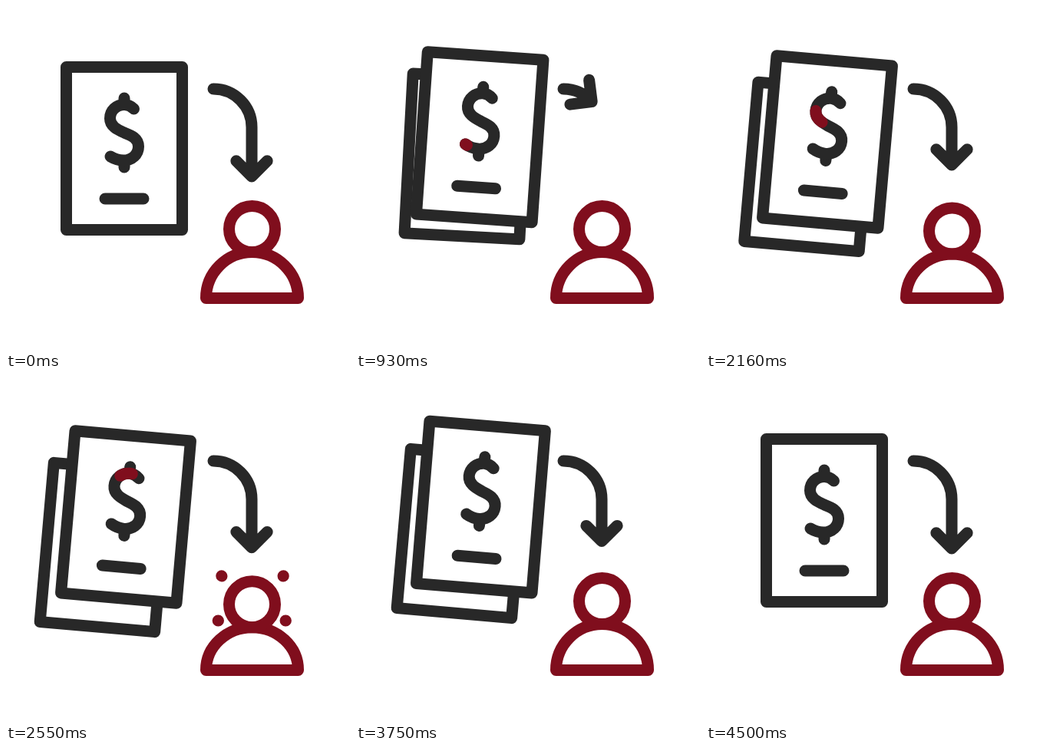
An HTML page that plays this animation: 448x448 px, repeating every 4980 ms.

```html
<!DOCTYPE html>
<html lang="en">
<head>
<meta charset="utf-8">
<title>Document sent to a person</title>
<style>
  html, body { margin: 0; width: 100%; height: 100%; overflow: hidden; background: #fff; }
  svg { display: block; width: 100%; height: 100%; }
  path, rect, circle { stroke-width: 15; stroke-linecap: round; stroke-linejoin: round; }
  .dark { stroke: #282828; }
  .red { stroke: #800e1d; }
  .paper { fill: #fff; }
</style>
</head>
<body>
<svg viewBox="0 0 448 448" fill="none">
  <rect id="back" class="dark paper" x="-75" y="-104" width="150" height="208"/>
  <g id="front">
    <rect class="dark paper" x="-75.5" y="-106" width="151" height="212"/>
    <path class="dark" d="M-25 65.5H25M0 -65.5V-58M0 17V24.5"/>
    <path class="dark" id="curve"/>
    <path class="red" id="trail" pathLength="100"/>
    <path class="red" id="nub"/>
  </g>
  <path id="arrow" class="dark"/>
  <path id="rays" class="red"/>
  <path id="body" class="red"/>
  <circle id="head" class="red" cx="320.5" r="30"/>
</svg>
<script>
const LOOP = 4980, STEP = 30;
const $ = id => document.getElementById(id);
const set = (id, attrs) => {
  for (const key in attrs) $(id).setAttribute(key, attrs[key]);
};

const span = (t, from, to) => Math.min(1, Math.max(0, (t - from) / (to - from)));
const sine = (t, from, to) => (1 - Math.cos(Math.PI * span(t, from, to))) / 2;
const cubic = (t, from, to) => {
  const u = span(t, from, to);
  return u < 0.5 ? 4 * u ** 3 : 1 - 4 * (1 - u) ** 3;
};
const mix = (a, b, u) => a + (b - a) * u;

const S_CURVE = 'M-18 10.5C-13 13.5 -7 15.5 -1 15.5C10 15.5 18.5 8 18.5 -2.5' +
  'C18.5 -13.5 9 -17 0 -20.5C-9 -24.5 -18.5 -29 -18.5 -39' +
  'C-18.5 -49.5 -10 -57 0 -57C5 -57 9 -55 12.5 -51.5';
set('curve', { d: S_CURVE });
set('trail', { d: S_CURVE });

// Each sheet fans out by (dx, dy) and 5 degrees, then dips by (sx, sy).
function placeSheet(id, fan, dip, [dx, dy], [sx, sy]) {
  const x = 154 + dx * fan + sx * dip;
  const y = 185.5 + dy * fan + sy * dip;
  set(id, { transform: `translate(${x} ${y}) rotate(${5 * fan})` });
}

function drawSheets(t) {
  placeSheet('front', sine(t, 330, 1180) - sine(t, 3630, 4400),
    sine(t, 1740, 2430) - sine(t, 2460, 3000), [9, -18.5], [-7.5, 15]);
  placeSheet('back', sine(t, 500, 1250) - sine(t, 3760, 4480),
    sine(t, 1910, 2500) - sine(t, 2560, 3100), [-17, 17], [-9, 18]);
}

function drawTrail(t) {
  const head = 100 * span(t, 900, 2680);
  const tail = Math.min(99.4, 100 * span(t, 1170, 2860));
  set('trail', {
    'stroke-dasharray': `${Math.max(0.1, head - tail)} 300`,
    'stroke-dashoffset': -tail,
    visibility: t >= 900 && t < 3090 ? 'visible' : 'hidden'
  });
  const low = t >= 1500 && t < 1770, high = t >= 2610 && t < 2880;
  const y = low ? mix(17, 24.5, span(t, 1500, 1710)) : mix(-58, -65.5, span(t, 2610, 2820));
  set('nub', { d: low || high ? `M0 ${y}v.01` : '' });
}

function drawArrow(t) {
  const full = 142.5, short = 41, radius = 50, arc = radius * Math.PI / 2;
  const length = full
    + (short - full) * (cubic(t, 330, 1020) - cubic(t, 1620, 2430))
    - 10 * (sine(t, 2400, 3030) - sine(t, 3630, 4400));
  const a = Math.min(length, arc) / radius;
  const x = 270 + radius * Math.sin(a);
  const bend = 158 - radius * Math.cos(a);
  const y = bend + Math.max(0, length - arc);

  // The head turns a little later than the line itself.
  const turn = mix(37, 90, span(length, short, 105)) * Math.PI / 180;
  const wing = side => {
    const angle = turn + Math.PI + side * Math.PI / 4;
    return `${x + 28.5 * Math.cos(angle)} ${y + 28.5 * Math.sin(angle)}`;
  };
  set('arrow', {
    d: `M270 108A50 50 0 0 1 ${x} ${bend}L${x} ${y}M${wing(1)}L${x} ${y}L${wing(-1)}`
  });
}

function drawPerson(t) {
  const dip = 4.5 * (sine(t, 1890, 2400) - sine(t, 2400, 3300));
  set('head', { cy: 290.5 + dip });
  set('body', { d: `M260.5 380.5A60 ${60 - dip} 0 0 1 380.5 380.5Z` });

  const tip = sine(t, 2490, 3270), tail = sine(t, 2560, 3360);
  const ray = (x, y, dx, dy) =>
    `M${x + dx * tail} ${y + dy * tail}L${x + dx * tip + 0.01} ${y + dy * tip}`;
  const shown = t >= 2490 && t < 3360;
  set('rays', {
    d: shown ? ray(281, 258, -18, -17) + ray(361, 258, 17, -17) +
      ray(276.5, 316, -25.5, 0) + ray(364, 316, 25.5, 0) : ''
  });
}

function render(time) {
  const t = Math.floor(time % LOOP / STEP) * STEP;
  drawSheets(t);
  drawTrail(t);
  drawArrow(t);
  drawPerson(t);
}

const start = performance.now();
function tick() {
  render(performance.now() - start);
  requestAnimationFrame(tick);
}
tick();
</script>
</body>
</html>
```
